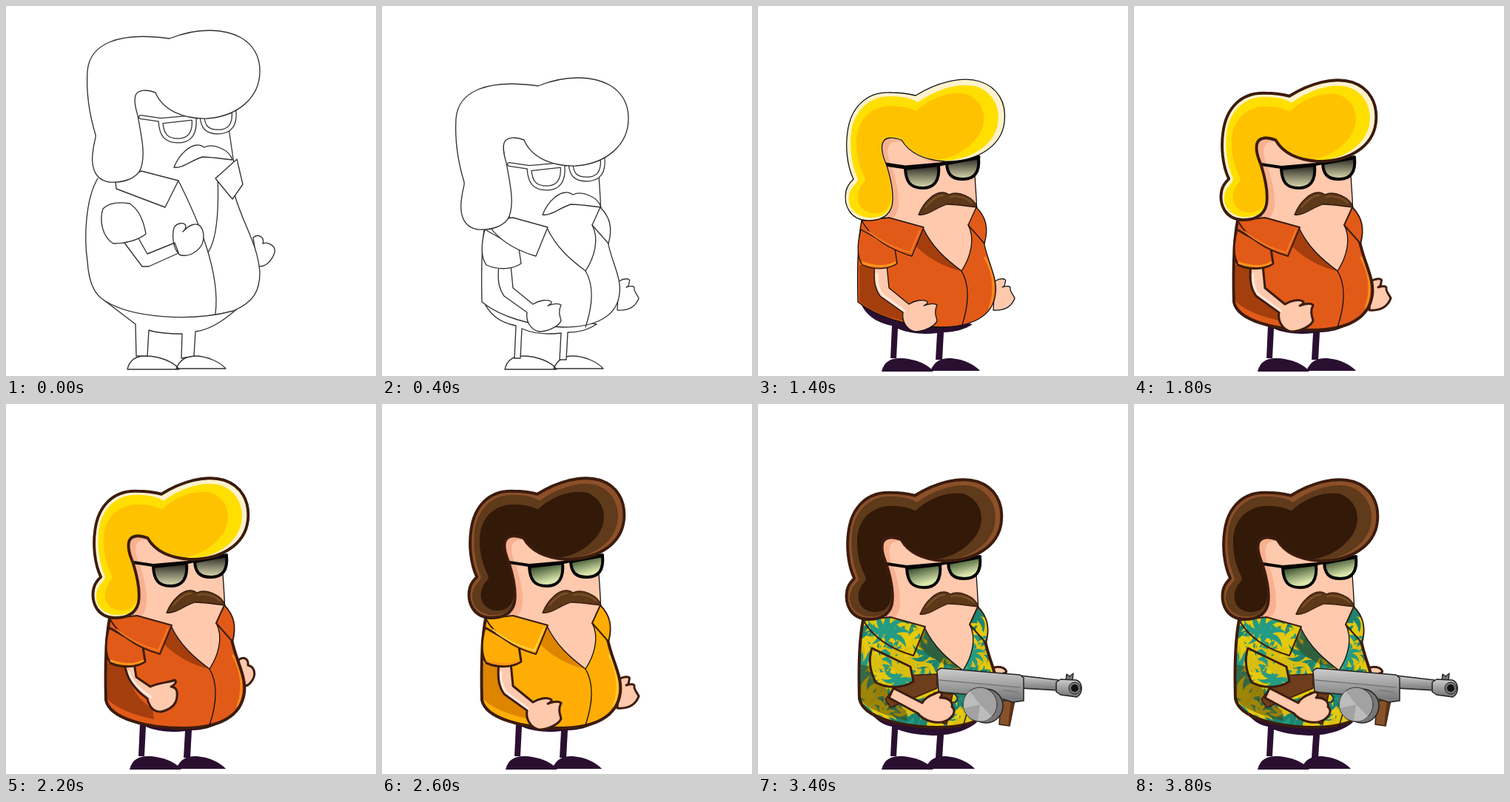
An HTML page that plays this animation: 500 px wide and 500 px high, repeating every 4 s.

```html
<!DOCTYPE html>
<html>
<head>
<meta charset="utf-8">
<style>
html, body { margin: 0; width: 100%; height: 100%; overflow: hidden; background: #fff }
svg { display: block; width: 100vw; height: 100vh }
path, circle { stroke-linejoin: round; stroke-linecap: round }
</style>
</head>
<body>
<svg id="stage" viewBox="0 0 500 500"></svg>
<script>
const stage = document.getElementById('stage');

const HAIR_SKETCH = 'M211 108C250 92 287 95 308 107C326 118 333 133 333 152C333 188 303 213 262 216C230 217 202 205 192 181C182 177 168 176 165 185C162 193 166 205 168 212C173 240 179 265 172 284C166 299 145 303 130 302C108 299 104 278 108 257C109 247 112 242 111 238C104 215 98 185 100 152C103 116 140 98 211 108Z';
const HAIR = 'M213 121C240 104 275 94 300 102C324 110 336 130 333 157C329 190 295 211 252 210C225 208 205 200 194 181C183 177 171 176 168 186C165 198 172 210 174 216C180 235 184 255 181 270C177 285 165 290 148 290C125 289 115 270 119 250C121 241 127 236 129 234C120 215 118 190 121 170C125 139 145 115 180 117C195 117 205 119 213 121Z';
const HAIR_MID = 'M216 130C245 110 275 103 296 109C318 117 328 138 324 160C318 190 285 209 250 209C225 207 205 199 194 180C183 176 171 176 167 186C164 198 171 210 173 216C179 235 183 255 180 270C175 283 163 287 148 286C128 283 119 268 124 252C127 243 134 240 135 234C125 210 124 190 126 170C130 142 150 121 180 122C198 122 210 126 216 130Z';
const HAIR_IN = 'M214 142C230 126 258 114 282 119C303 127 312 150 300 172C286 196 255 209 240 207C222 204 206 198 194 179C183 175 171 175 167 186C164 198 171 210 173 216C179 235 183 255 178 268C173 279 162 282 150 279C137 275 131 262 137 248C140 240 146 238 145 233C134 212 131 190 134 172C139 148 158 135 180 135C195 135 207 138 214 142Z';
const FACE = 'M162 165L288 180C293 220 295 250 296 285L284 296C294 315 287 340 275 358C255 343 236 327 223 300L172 286Z';
const LENSES = ['M199 220L244 215C246 236 238 246 223 246C206 246 200 238 199 220Z', 'M255 213L298 205C300 225 292 234 277 234C261 234 256 227 255 213Z'];
const BROW = 'M172 214L199 218L245 214L255 212L298 204';
const MUSTACHE = 'M217 282C225 262 240 252 248 252C252 251 255 253 258 255C270 249 292 258 296 272C280 270 265 268 255 268C240 273 228 284 217 282Z';
const SHOES = ['M167 492C170 479 179 474 191 474C211 474 230 482 237 492Z', 'M233 491C238 479 246 474 258 474C276 474 293 483 300 491Z'];
const PANTS = 'M137 398C145 418 160 428 181 432L179 476H187L189 436C205 443 225 444 242 442L240 478H249L251 441C265 441 280 437 290 430L240 420Z';

// garment and limb outlines for each stance
const RAISED = {
  body: 'M124 233C108 260 105 310 110 345C112 375 120 390 133 398C170 422 250 427 307 412C335 400 343 385 343 360C340 320 320 295 309 255',
  placket: 'M233 236C260 290 290 360 283 416M286 230C288 280 285 315 273 333',
  collar: 'M148 237L149 247L215 272L233 236L183 223ZM283 233L312 207L320 241L306 261Z',
  sleeve: 'M131 274C140 265 155 265 167 267C180 275 186 290 189 308C178 317 160 321 145 321C130 312 126 290 131 274Z',
  arm: 'M160 320L184 352H193L233 334C226 328 224 310 227 300C230 293 242 291 243 298C243 301 240 304 239 305C248 295 258 292 263 298C268 305 268 315 265 322C258 334 245 340 234 336L228 320L191 335L179 314Z',
  far: 'M334 313C340 307 350 312 347 321C355 318 365 325 363 333C360 343 350 355 340 351Z',
  pants: 'M133 398L175 430L176 473H191L193 438C205 442 225 443 238 443L237 476L254 473L256 440C280 437 300 420 320 403L240 400Z'
};
const DOWN = {
  body: 'M140 290C134 320 134 360 135 400C160 420 200 432 245 434C288 434 318 420 321 388C324 368 310 345 305 318L290 290Z',
  placket: 'M275 358C288 380 283 410 275 434',
  collar: 'M140 290L177 286L224 299L208 338C180 330 155 316 140 290ZM284 296L295 272C308 285 312 300 306 321Z',
  sleeve: 'M139 302C133 325 134 340 141 350C160 358 178 355 188 348L185 328Z',
  arm: 'M158 350C155 375 160 385 165 392L196 414C194 425 200 437 212 440C225 440 240 432 242 425C240 418 238 412 242 404C238 401 232 402 224 405C230 402 230 400 228 399C222 396 212 398 204 403L177 381L174 350Z',
  far: 'M320 372C328 367 337 368 334 373C334 377 332 380 330 380C336 378 342 378 341 382C340 385 346 392 347 395C342 408 332 412 318 411Z',
  pants: PANTS
};
const BENT = {
  ...DOWN,
  body: 'M140 290C134 320 134 360 135 400C140 425 190 438 240 438C288 438 318 422 322 390C325 368 310 345 305 318L290 290Z',
  arm: 'M160 350C163 374 178 389 191 398C194 411 200 416 209 416C222 413 230 407 231 396C232 387 230 383 223 382C229 379 231 375 228 373C218 377 208 376 195 382L176 369L173 350Z',
  far: 'M314 346C322 340 328 345 327 353C336 355 338 365 333 373C328 381 324 382 318 380Z'
};
const ARMED = {
  ...BENT,
  body: 'M140 290C134 320 134 360 135 396C140 422 190 434 240 435C288 435 318 420 321 390C324 368 310 345 305 318L290 290Z',
  sleeve: 'M150 318C144 335 148 350 155 364C172 374 194 371 206 363L202 343Z',
  arm: 'M183 364L222 384C224 378 232 374 240 371C247 367 251 371 246 377C256 376 264 382 262 389C267 393 265 399 262 402C256 410 244 412 234 409C226 407 219 402 216 398L177 377Z',
  far: 'M312 340C325 333 336 341 333 345L315 351Z',
  pants: 'M150 415C160 428 170 434 181 436L179 476H187L189 440C205 446 225 448 242 448L240 478H249L251 447C265 446 285 440 296 430L240 420Z'
};

const BLONDE = ['#fff2cc', '#ffdf00', '#ffc200'], GOLD = ['#fff0a8', '#ffd60a', '#ffc000'], BROWN = ['#8c5029', '#5f3a1b', '#321908'];
const INK = '#111', EDGE = '#3c1c0e';

const p = (d, fill = 'none', stroke = 'none', w = 1.3, extra = '') =>
  `<path d="${d}" fill="${fill}" stroke="${stroke}" stroke-width="${w}" ${extra}/>`;
const g = (x, y, content) => `<g transform="translate(${x} ${y})">${content}</g>`;

// fabric of fanned, curved leaves; fans keep clear of an optional blank spot
function fabric(id, base, colors, seed, blank) {
  const rnd = () => (seed = seed * 16807 % 2147483647) / 2147483647;
  let leaves = '';
  for (let i = 0; i < 110; i++) {
    const x = 130 + rnd() * 195, y = 275 + rnd() * 165, turn = rnd() * 360, size = .6 + rnd() * .6;
    const color = colors[rnd() * colors.length | 0];
    if (Math.hypot(x - 218, y - 350) < blank) continue;
    for (let k = 0; k < 6; k++)
      leaves += p('M0 0Q12 -20 30 -6Q14 -10 0 8Z', color, 'none', 0,
        `transform="translate(${x} ${y}) rotate(${turn + k * 36}) scale(${size})"`);
  }
  return `<pattern id="${id}" width="500" height="500" patternUnits="userSpaceOnUse"><path d="M0 0H500V500H0Z" fill="${base}"/>${leaves}</pattern>`;
}
const ramp = (id, x, a, b) => `<linearGradient id="${id}" x1="0" y1="0" x2="${x}" y2="1"><stop offset=".1" stop-color="${a}"/><stop offset=".9" stop-color="${b}"/></linearGradient>`;
const defs = '<defs>' +
  fabric('blue', '#fff', ['#174a7c', '#2563a0', '#7fb0da', '#fff', '#fff'], 41, 42) +
  fabric('tropic', '#2a9179', ['#249b83', '#1b8571', '#e5c90d', '#e5c90d', '#d9bd10'], 97, 0) +
  ramp('tan', 0, '#30291c', '#e0d5a6') + ramp('grey', 0, '#36352c', '#cfcda4') +
  ramp('green', .4, '#20391a', '#dbe6ac') + ramp('steel', 0, '#c4c4c4', '#7c7c7c') +
  `<clipPath id="face"><path d="${FACE}"/></clipPath></defs>`;

function gun(x, y) {
  return g(x, y,
    p('M180 379L187 390L212 380L250 364V345L206 347Z', '#6d3d1c', EDGE, 1.5) +
    p('M246 370L240 405L263 413L271 372Z', '#6d3d1c', EDGE, 1.5) +
    p('M268 370C282 372 280 388 266 382', 'none', '#333', 2) +
    p('M336 381L334 413L348 415L355 380Z', '#87522a', EDGE, 1.5) +
    p('M350 380L346 414L348 415L355 380Z', '#5c3317') +
    p('M362 347L414 353V367L362 364Z', 'url(#steel)', '#222') +
    p('M250 340L255 337L362 346L367 350V381L352 383L330 376L252 369Z', 'url(#steel)', '#222', 1.5) +
    p('M252 353L362 363M340 367L358 369', 'none', '#777') +
    '<circle cx="316" cy="388" r="23" fill="#777" stroke="#222" stroke-width="1.5"/>' +
    '<circle cx="308" cy="386" r="23" fill="#a2a2a2" stroke="#333"/>' +
    p('M308 386L294 368C287 375 285 383 287 391ZM308 386L324 402C317 409 311 409 305 408Z', '#bcbcbc') +
    p('M424 353L425 345L429 348L434 344L433 356Z', '#777', '#222') +
    p('M411 356L417 352L438 353C447 356 448 370 439 376L417 373L411 369Z', 'url(#steel)', '#222', 1.5) +
    '<circle cx="436" cy="364" r="8" fill="#777" stroke="#222"/><circle cx="436" cy="364" r="5" fill="#111"/>');
}

function sketch(step) {
  const raised = step < 2, s = raised ? RAISED : DOWN, line = d => p(d, '#fff', '#333', 1.35);
  const [x, y] = [[0, 0], [-1, 5], [0, 0], [0, -1]][step];
  const lenses = LENSES.join('');
  const glasses = p(BROW, 'none', '#333', 6) + p(lenses, '#fff', '#333', 7) +
    p(BROW, 'none', '#fff', 3.5) + p(lenses, 'none', '#fff', 4.5);
  const head = glasses + line(MUSTACHE) + line(HAIR_SKETCH);
  const face = raised ? p('M301 165L308 213', 'none', '#333') : line(FACE);
  return g(raised ? -3 : -1, -1, line(SHOES.join(''))) + line(s.pants) +
    g(x, y, line(s.far) + line(s.body) + face + p(s.placket, 'none', '#333') +
      line(s.arm) + line(s.sleeve) + line(s.collar) + g(raised ? 10 : 0, raised ? -64 : 0, head));
}

function painted(step) {
  const bold = step > 8, armed = step > 13, dark = step > 12, early = step < 6;
  const shaded = step > 6, tropic = step > 16;
  const s = armed ? ARMED : step > 9 && step < 13 ? BENT : bold ? { ...DOWN, body: BENT.body } : DOWN;
  const skin = early ? '#ffede4' : '#ffc9ad';
  const shirt = tropic ? 'url(#tropic)' : dark ? '#ffad05' : step == 5 ? 'url(#blue)' : step == 4 ? '#6da0cc' : '#e25a18';
  const shade = tropic ? 'rgba(70,50,0,.45)' : dark ? '#de8500' : '#a53e0d';
  const trousers = early ? '#582c00' : '#2a0f31';
  const hair = dark ? BROWN : early ? GOLD : BLONDE;
  const lens = dark ? 'green' : early ? 'tan' : 'grey';
  const edge = bold ? EDGE : INK, w = bold ? 4 : 1.3, limb = bold ? 3 : 1.3;
  const [gx, gy] = step == 15 ? [0, 0] : step == 14 ? [-5, 4] : step == 16 ? [-6, 16] : [-8, 20];
  const plain = shaded && !tropic;

  let shadow = '', rim = '';
  if (shaded)
    shadow = p('M137 350L163 356C168 385 180 400 198 412L200 426C170 420 148 410 137 399Z', shade) +
      p('M224 300L214 325C232 343 255 354 275 358C255 343 240 325 224 300Z', shade);
  if (plain) {
    shadow += p('M307 340C318 360 322 385 313 408', 'none', dark ? '#ffc931' : '#ff8a1c', 3);
    rim = armed ? p('M157 362C172 369 190 368 203 362', 'none', '#ffc931', 3)
      : p('M142 347C160 354 176 352 185 347', 'none', '#ff951c', 3);
  }
  const collarRim = plain ? p('M150 305C168 320 190 329 206 333L219 303', 'none', dark ? '#ffd04a' : '#f47b22', 2) : '';
  const farHand = armed ? (tropic ? g(0, gy * .8, p(s.far, skin, edge, limb)) : '') : p(s.far, skin, edge, limb);
  const tint = shaded
    ? `<g clip-path="url(#face)">${p(HAIR, '#f7b190', 'none', 0, 'transform="translate(8 5)"')}</g>` : '';
  const armArt = p(s.arm, skin, edge, limb) +
    (shaded && !armed ? p(step < 10 || step == 13 ? 'M161 362C160 378 165 388 172 393L198 412' : 'M166 362C170 377 183 387 196 396', 'none', '#ffe9dd', 3) : '');

  const head =
    p(BROW, 'none', '#050505', bold ? 4 : 5) +
    LENSES.map(d => p(d, `url(#${lens})`, '#050505', 4)).join('') +
    p(MUSTACHE, early ? '#70391a' : '#5d3919', dark ? EDGE : '#2b160b') +
    (step == 4 ? '' : p('M226 272C236 260 244 256 250 256M259 258C270 255 283 260 289 266', 'none', early ? '#a36443' : '#82532b', 1.8)) +
    `<g transform="${bold ? 'translate(2.5 2) scale(.974 .99)' : ''}">` +
    p(HAIR, step == 4 ? hair[2] : hair[0]) +
    (step == 4 ? '' : p(HAIR_MID, hair[1]) + p(HAIR_IN, hair[2])) + p(HAIR, 'none', edge, w) + '</g>';

  const torso = farHand + p(s.body, shirt) + shadow + p(s.body, 'none', edge, w) +
    p(FACE, skin, INK) + tint + p(s.placket, 'none', INK) +
    (armed ? gun(gx - 2, gy - 2) : '') +
    (armed ? g(gx / 4, gy - 2, armArt) : armArt) +
    (armed ? g(2, gy * .5, p(s.sleeve, shirt, edge, 3) + rim) : p(s.sleeve, shirt, edge, limb) + rim) +
    p(s.collar, shirt, edge, bold ? 2 : 1.3) + collarRim + head;

  const shoe = d => p(d, trousers, early ? INK : 'none', 1.2);
  return p(s.pants, trousers, early ? INK : 'none') +
    g(0, early ? 0 : 2, shoe(SHOES[0])) + g(armed ? -7 : step > 9 ? -3 : 0, early ? 0 : 2, shoe(SHOES[1])) +
    g(armed ? 2 : 0, armed ? 2 : 0, torso);
}

let shown = -1;
function frame() {
  const step = Math.floor(performance.now() % 4000 / 200);
  if (step != shown) {
    shown = step;
    stage.innerHTML = defs + (step < 4 ? sketch(step) : painted(step));
  }
  requestAnimationFrame(frame);
}
frame();
</script>
</body>
</html>
```
